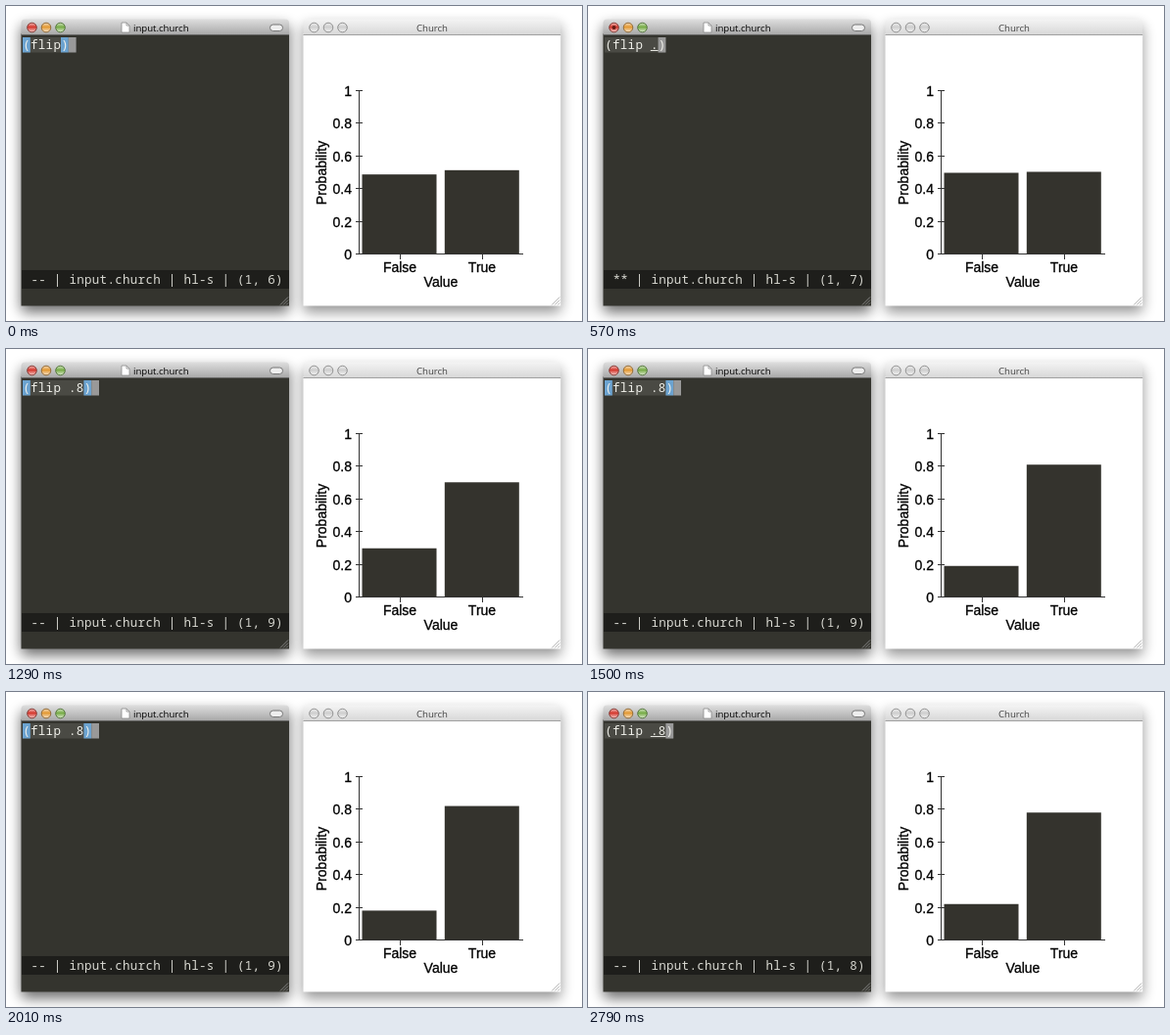
Write an HTML page that moves like this. It is 588 px wide and 322 px high and loops after 2.94 s.

```html
<!DOCTYPE html>
<html lang="en">
<head>
<meta charset="utf-8">
<title>Editor and histogram</title>
<style>
  html, body { margin: 0; width: 100%; height: 100%; overflow: hidden; background: #fff; }
  svg { display: block; width: 588px; height: 322px; }
  text { white-space: pre; }
  .mono { font: 12.5px "Noto Sans Mono", "DejaVu Sans Mono", monospace; letter-spacing: .3px; fill: #f0f0ea; }
  #status { fill: #d9d9d2; }
  .title { font: 9.6px "Open Sans", "Noto Sans", sans-serif; }
  .label { font: 14px "Liberation Sans", Arial, sans-serif; fill: #000; stroke: #000; stroke-width: .3px; }
  .axis { stroke: #333; fill: none; shape-rendering: crispEdges; }
  .bar { fill: #34332d; }
</style>
</head>
<body>
<svg id="stage" viewBox="0 0 588 322" xmlns="http://www.w3.org/2000/svg">
  <defs>
    <linearGradient id="active" x2="0" y2="1">
      <stop offset="0" stop-color="#dedede"/><stop offset="1" stop-color="#a9a9a9"/>
    </linearGradient>
    <linearGradient id="idle" x2="0" y2="1">
      <stop offset="0" stop-color="#f4f4f4"/><stop offset="1" stop-color="#d8d8d8"/>
    </linearGradient>
    <linearGradient id="gloss" x2="0" y2="1">
      <stop offset=".1" stop-color="#fff" stop-opacity=".5"/>
      <stop offset=".45" stop-color="#fff" stop-opacity="0"/>
      <stop offset="1" stop-color="#fff" stop-opacity=".75"/>
    </linearGradient>
    <filter id="blur" x="-20%" y="-20%" width="140%" height="140%">
      <feGaussianBlur stdDeviation="7"/>
    </filter>
  </defs>
  <g id="windows"></g>

  <path d="M118 17h5l3 3v7h-8z" fill="#fff" stroke="#8c8c8c" stroke-width=".8"/>
  <path d="M123 17v3h3" fill="none" stroke="#8c8c8c" stroke-width=".8"/>
  <text class="title" x="130" y="25.5" fill="#000">input.church</text>
  <rect x="269.5" y="19" width="13" height="6.5" rx="3.2" fill="#eee" stroke="#777"/>
  <text class="title" x="435" y="25.5" fill="#444" text-anchor="middle">Church</text>
  <circle id="dirty" cx="26.5" cy="22" r="2" fill="#651a14"/>

  <rect id="sexp" x="17" y="32" height="15.5" fill="#4a4a44"/>
  <rect id="open" x="17" y="32" width="7.8" height="15.5" fill="#6ca3d0"/>
  <rect id="close" y="32" width="7.8" height="15.5" fill="#6ca3d0"/>
  <rect id="cursor" y="32" width="7.8" height="15.5" fill="#999"/>
  <rect id="under" y="45" height="1" fill="#e4e4de"/>
  <text id="code" class="mono" x="17.2" y="44"></text>
  <rect x="16" y="270" width="273" height="19" fill="#1e1e1b"/>
  <text id="status" class="mono" x="25.4" y="284"></text>

  <rect id="no" class="bar" x="363.5" width="76"/>
  <rect id="yes" class="bar" x="447.8" width="76"/>
  <g id="chart"></g>
</svg>
<script>
const $ = id => document.getElementById(id);
const LOOP = 2940, CHAR = 7.8, LEFT = 17, BASE = 253.5, SCALE = 167;

// start time, text, cursor column, unsaved, underlined columns
const edits = [
  [0, "(flip)", 6, false, 0, 0],
  [150, "(flip)", 5, false, 1, 5],
  [420, "(flip )", 6, true, 0, 0],
  [570, "(flip .)", 7, true, 6, 7],
  [660, "(flip .8)", 8, true, 6, 8],
  [900, "(flip .8)", 9, true, 0, 0],
  [930, "(flip .8)", 9, false, 0, 0],
  [2790, "(flip .8)", 8, false, 6, 8]
];

// start time, share of False
const shares = [
  [0, .487], [60, .49], [120, .494], [180, .497],
  [1200, .42], [1290, .298], [1380, .24], [1500, .19], [1620, .145], [1710, .118],
  [1800, .14], [1890, .16], [2010, .18], [2100, .193], [2220, .2],
  [2340, .207], [2430, .211], [2640, .214], [2730, .217], [2790, .22]
];

const latest = (list, t) => list.findLast(entry => entry[0] <= t);

function set(id, attrs) {
  for (const key in attrs) $(id).setAttribute(key, attrs[key]);
}

function windowFrame(x, w, title, fill, shade, buttons) {
  const top = `M${x} 29V17.5q0-4 4-4h${w - 8}q4 0 4 4V29z`;
  const dots = buttons.map(([color, rim], i) => {
    const spot = `cx="${x + 11 + i * 14.5}" cy="22" r="4.8"`;
    return `<circle ${spot} fill="${color}"/>
      <circle ${spot} fill="url(#gloss)" stroke="${rim}" stroke-width=".9"/>`;
  }).join("");
  const right = x + w;
  return `<rect x="${x}" y="20" width="${w}" height="293" rx="4" opacity="${shade}" filter="url(#blur)"/>
    <rect x="${x}" y="28" width="${w}" height="278.5" fill="${fill}"/>
    <path d="${top}" fill="url(#${title})"/>
    <path d="M${x} 29.5h${w}" stroke="#777" stroke-width=".7"/>
    <path d="M${right - 9} 305.5l8-8M${right - 6} 305.5l5-5M${right - 3} 305.5l2-2" stroke="#999" stroke-width=".8"/>
    ${dots}`;
}

function chart() {
  let path = `M360.5 86V${BASE}H528`, labels = "";
  for (let i = 0; i <= 5; i++) {
    const y = Math.round(BASE - .5 - i * SCALE / 5);
    path += `M357 ${y + .5}h7`;
    labels += `<text class="label" x="353" y="${y + 6}" text-anchor="end">${i / 5}</text>`;
  }
  [["False", 402], ["True", 486]].forEach(([name, x]) => {
    path += `M${x + .5} ${BASE}v5`;
    labels += `<text class="label" x="${x}" y="272" text-anchor="middle">${name}</text>`;
  });
  return `<path class="axis" d="${path}"/>${labels}
    <text class="label" x="444" y="287" text-anchor="middle">Value</text>
    <text class="label" transform="translate(327 170.5) rotate(-90)" text-anchor="middle">Probability</text>`;
}

function draw(t) {
  const [, code, col, unsaved, from, to] = latest(edits, t);
  const matched = col === code.length;
  const at = c => LEFT + c * CHAR;
  $("code").textContent = code;
  $("status").textContent = `${unsaved ? "**" : "--"} | input.church | hl-s | (1, ${col})`;
  set("sexp", { width: code.length * CHAR });
  set("open", { opacity: +matched });
  set("close", { opacity: +matched, x: at(code.length - 1) });
  set("cursor", { x: at(col) });
  set("under", { x: at(from), width: (to - from) * CHAR });
  set("dirty", { opacity: +unsaved });

  const share = latest(shares, t)[1];
  [["no", share], ["yes", 1 - share]].forEach(([id, value]) =>
    set(id, { y: BASE - value * SCALE, height: value * SCALE }));
}

const grey = ["#cfcfcf", "#8a8a8a"];
$("windows").innerHTML =
  windowFrame(15.5, 273.5, "active", "#34342e", .58,
    [["#d63a30", "#7c3630"], ["#e39a35", "#8a6433"], ["#78ad48", "#50703a"]]) +
  windowFrame(303.5, 262.7, "idle", "#fff", .42, [grey, grey, grey]);
$("chart").innerHTML = chart();

const start = performance.now();
function tick() {
  draw((performance.now() - start) % LOOP);
  requestAnimationFrame(tick);
}
tick();
</script>
</body>
</html>
```
